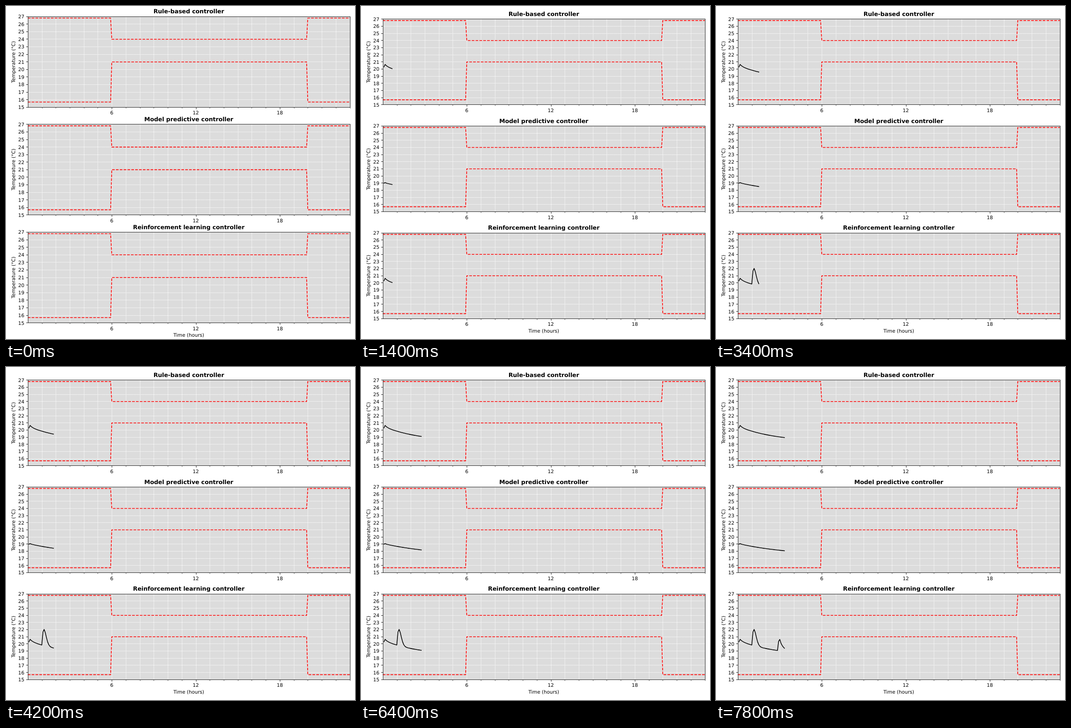
Write an HTML page that moves like this. It is 766 px wide and 731 px high and loops after 8000 ms.

```html
<!DOCTYPE html>
<html lang="en">
<head>
<meta charset="utf-8">
<title>Controller comparison</title>
<style>
  html, body { margin: 0; width: 100%; height: 100%; overflow: hidden; background: #fff; }
  svg { display: block; width: 766px; height: 731px; }
  text { font: 10.64px "DejaVu Sans", sans-serif; text-anchor: middle; text-rendering: geometricPrecision; }
  .title { font-size: 12.77px; font-weight: bold; }
  .num { text-anchor: end; }
  path, .frame { fill: none; stroke: #000; stroke-width: .85; }
  .grid { stroke: #fff; stroke-dasharray: 1.97 .85; }
  .minor { stroke-width: .64; }
  .limit { stroke: #f00; stroke-width: 1.6; stroke-dasharray: 5.9 2.55; }
  .curve { stroke-width: 1.6; stroke-linejoin: round; stroke-linecap: square; }
</style>
</head>
<body>
<svg id="stage" viewBox="0 0 766 731"></svg>
<script>
const LOOP = 8000, STEP = 200;
const LEFT = 47.8, RIGHT = 754.6, HOURS = 23, MIN = 15, MAX = 27;
const CENTER = (LEFT + RIGHT) / 2;
const DAY_START = 6, DAY_END = 20, SAMPLE = 1 / 12;

// The first step uses a taller layout than the rest.
const TALL = { top: 23.2, pitch: 236.65, height: 199.1 };
const TIGHT = { top: 28.7, pitch: 234.75, height: 188.1 };

// A room cools exponentially towards its floor after a short initial kick.
const cooling = (start, floor, span, tau, kick) => n =>
  n < 2 ? start : floor + span * Math.exp(-n / tau) + kick * Math.exp(1 - n / 2);

// A heating burst rises within two samples, then fades.
const burst = (peak, height, fade, power) => n => {
  if (n <= peak - 2) return 0;
  return height * (n < peak ? .82 : Math.exp(-(((n - peak) / fade) ** power)));
};

const ruleBased = cooling(20.3, 18.3, 2.24, 32.3, .24);
const predictive = cooling(19, 17.3, 1.79, 47.5, .05);
const bursts = [burst(14, 2.28, 2.66, 1.7), burst(36, 1.6, 3.05, .9)];
const learned = n => bursts.reduce((sum, heat) => sum + heat(n), ruleBased(n));

const PANELS = [
  { title: 'Rule-based controller', valueAt: ruleBased },
  { title: 'Model predictive controller', valueAt: predictive },
  { title: 'Reinforcement learning controller', valueAt: learned }
];

const snapX = x => Math.round(x) + .5;
const snapY = y => Math.floor(y) + .5;
const xAt = hour => LEFT + hour / HOURS * (RIGHT - LEFT);
const path = (cls, d) => `<path class="${cls}" d="${d}"/>`;
const text = (cls, x, y, s, extra = '') =>
  `<text class="${cls}" x="${x}" y="${Math.round(y)}" ${extra}>${s}</text>`;
const polyline = points => 'M' + points.map(p => p.map(v => v.toFixed(2)).join(' ')).join('L');

function drawPanel({ title, valueAt }, index, step) {
  const layout = step ? TIGHT : TALL;
  const top = layout.top + index * layout.pitch;
  const bottom = top + layout.height;
  const yAt = temp => bottom - (temp - MIN) / (MAX - MIN) * layout.height;
  const l = snapX(LEFT), r = snapX(RIGHT), t = snapY(top), b = snapY(bottom);
  const box = `x="${l}" y="${t}" width="${r - l}" height="${b - t}"`;
  let grid = '', major = '', minor = '', labels = '', lines = '';

  for (let hour = 1; hour <= HOURS; hour++) {
    const x = snapX(xAt(hour));
    if (hour < HOURS) grid += `M${x} ${b}V${t}`;
    if (hour % 6) {
      minor += `M${x} ${b}v2.6`;
    } else {
      major += `M${x} ${b}v4.2`;
      labels += text('', xAt(hour), bottom + 16, hour);
    }
  }
  for (let temp = MIN; temp <= MAX; temp++) {
    const y = snapY(yAt(temp));
    if (temp > MIN && temp < MAX) grid += `M${l} ${y}H${r}`;
    major += `M${l} ${y}h-4.2`;
    labels += text('num', 40.3, yAt(temp) + 3.9, temp);
  }

  const limit = (night, day) => path('limit', polyline([
    [xAt(0), yAt(night)], [xAt(DAY_START - SAMPLE), yAt(night)],
    [xAt(DAY_START), yAt(day)], [xAt(DAY_END - SAMPLE), yAt(day)],
    [xAt(DAY_END), yAt(night)], [xAt(HOURS), yAt(night)]
  ]));
  lines += limit(26.8, 24) + limit(15.7, 21);

  if (step) {
    const points = Array.from({ length: step + 1 }, (_, i) =>
      [xAt((i + 1) * SAMPLE), yAt(valueAt(i + 1))]);
    lines += path('curve', polyline(points));
  }

  labels += text('title', CENTER, top - 6.9, title);
  const mid = Math.round((top + bottom) / 2);
  labels += text('', 19.5, mid, 'Temperature (°C)', `transform="rotate(-90 19.5 ${mid})"`);
  if (index === PANELS.length - 1) labels += text('', CENTER, bottom + 30.5, 'Time (hours)');

  return `<rect ${box} fill="#dcdcdc"/>` + path('grid', grid) + lines +
    path('', major) + path('minor', minor) + `<rect class="frame" ${box}/>` + labels;
}

const stage = document.getElementById('stage');
const start = performance.now();
let shown = -1;

function render() {
  const step = Math.floor((performance.now() - start) % LOOP / STEP);
  if (step !== shown) {
    stage.innerHTML = PANELS.map((panel, i) => drawPanel(panel, i, step)).join('');
    shown = step;
  }
  requestAnimationFrame(render);
}
render();
</script>
</body>
</html>
```
